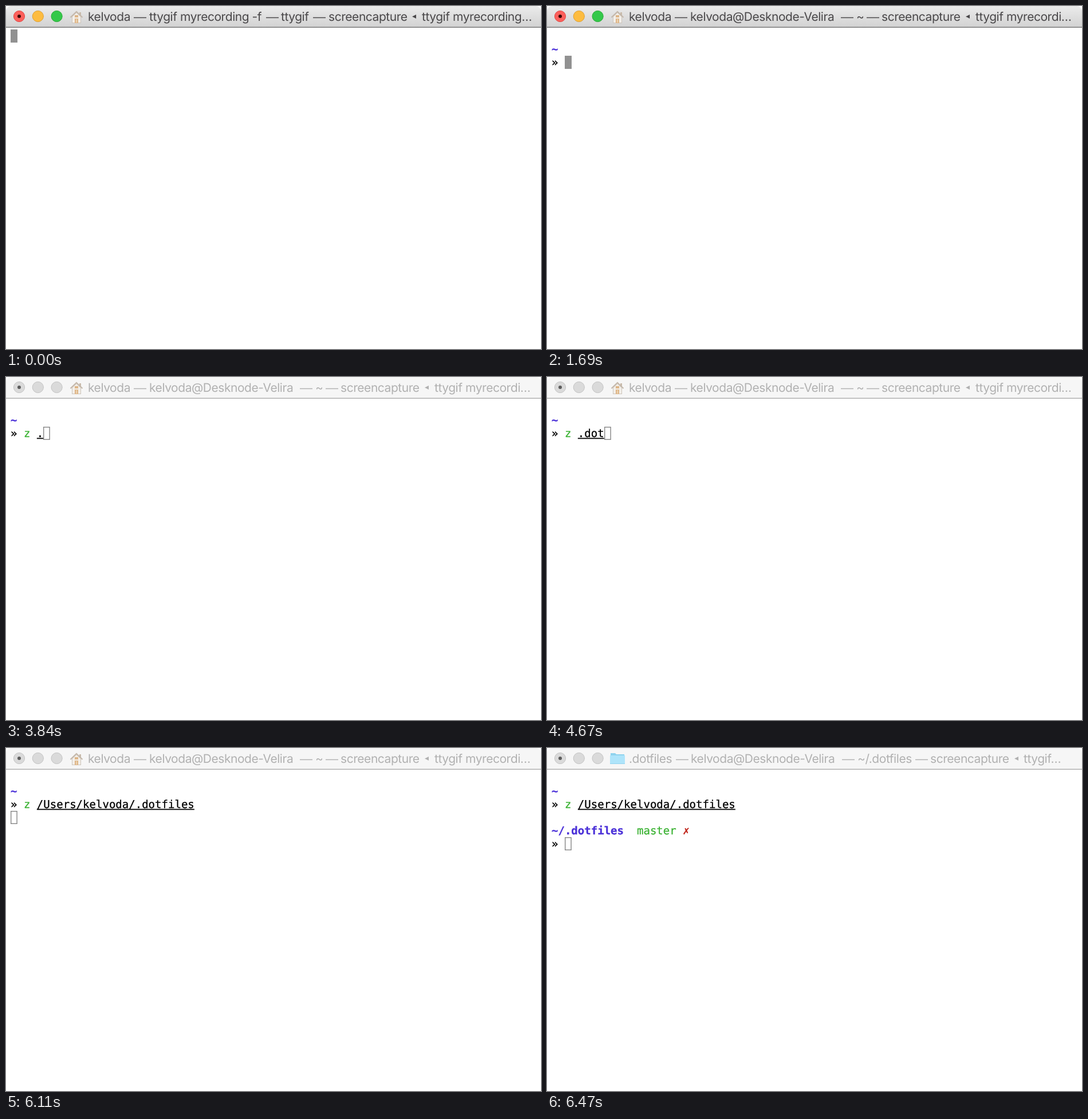
Write an HTML page with a canvas that moves like this. It is 934 by 600 pixels and loops after 8000 ms.

```html
<!DOCTYPE html>
<html lang="en">
<head>
<meta charset="utf-8">
<title>Terminal</title>
<style>
  html, body { margin: 0; width: 100%; height: 100%; overflow: hidden; background: #fff; }
  canvas { display: block; }
</style>
</head>
<body>
<canvas id="stage" width="934" height="600"></canvas>
<script>
const ctx = document.getElementById('stage').getContext('2d');
ctx.textRendering = 'geometricPrecision';
const LOOP = 8000;
const CELL = 11.46, ROW = 23, LEFT = 8, TOP = 41;
const USER = 'kelvoda', HOST = USER + '@Desknode-Velira';
const INK = '#000', BLUE = '#4b31d8', GREEN = '#3bb233', RED = '#c0261c', GREY = '#919191';

// Title pieces with their left edges
const TITLES = {
  record: [[USER, 143], ['—', 223], ['ttygif myrecording -f', 250], ['—', 454], ['ttygif', 480],
    ['—', 536], ['screencapture', 563], ['◂', 709], ['ttygif myrecording…', 726]],
  home: [[USER, 143], ['—', 223], [HOST, 250], ['—', 513], ['~', 540], ['—', 558],
    ['screencapture', 584], ['◂', 731], ['ttygif myrecordi…', 748]],
  moved: [[USER, 143], ['—', 223], [HOST, 250], ['—', 513], ['~/.dotfiles', 540], ['—', 641],
    ['screencapture', 667], ['◂', 814], ['ttygif…', 831]],
  folder: [['.dotfiles', 143], ['—', 225], [HOST, 251], ['—', 515], ['~/.dotfiles', 542], ['—', 643],
    ['screencapture', 669], ['◂', 816], ['ttygif…', 832]]
};

const PATH = `/Users/${USER}/.dotfiles`;
// [time, command typed so far]
const TYPING = [[2800, 'z'], [3070, 'z '], [3840, 'z .'], [4170, 'z .d'], [4450, 'z .do'],
  [4670, 'z .dot'], [5090, 'z .dotf'], [5360, `z ${PATH} `]];

function rect(x, y, w, h, color) {
  ctx.fillStyle = color;
  ctx.fillRect(x, y, w, h);
}

function shape(points, color) {
  ctx.fillStyle = color;
  ctx.beginPath();
  points.forEach(([x, y]) => ctx.lineTo(x, y));
  ctx.closePath();
  ctx.fill();
}

function disc(x, y, r, fill, edge) {
  ctx.beginPath();
  ctx.arc(x, y, r, 0, Math.PI * 2);
  ctx.fillStyle = fill;
  ctx.fill();
  if (edge) {
    ctx.strokeStyle = edge;
    ctx.lineWidth = 1;
    ctx.stroke();
  }
}

// A hairline stroke gives the slightly heavier smoothing of the terminal type
function print(text, col, row, color, bold) {
  const x = LEFT + col * CELL, y = TOP + row * ROW + 18;
  ctx.font = `${bold ? 'bold ' : ''}19.04px "DejaVu Sans Mono", monospace`;
  ctx.fillStyle = ctx.strokeStyle = color;
  ctx.lineWidth = 0.3;
  ctx.fillText(text, x, y);
  ctx.strokeText(text, x, y);
}

function cursor(col, row, active) {
  const x = Math.round(LEFT + col * CELL), y = TOP + row * ROW;
  if (active) return rect(x, y, 12, ROW, GREY);
  ctx.strokeStyle = '#868686';
  ctx.lineWidth = 1.4;
  ctx.strokeRect(x + 0.7, y + 0.7, 10.4, ROW - 1.4);
}

function house() {
  rect(128, 11, 3, 6, '#c9bbab');
  shape([[115, 19], [123, 11], [131, 19], [131, 30], [115, 30]], '#cdc5bc');
  shape([[116, 19], [123, 12], [130, 19], [130, 29], [116, 29]], '#f3efe9');
  rect(120, 16, 6, 4, '#deb688');
  rect(120, 22, 6, 8, '#deb688');
  rect(122, 23, 2, 6, '#ecd3b2');
  ctx.strokeStyle = '#c4b8ab';
  ctx.lineWidth = 2;
  ctx.beginPath();
  ctx.moveTo(112.5, 20);
  ctx.lineTo(123, 10);
  ctx.lineTo(133.5, 20);
  ctx.stroke();
}

function folder() {
  shape([[111, 9], [119, 9], [121, 11], [135, 11], [135, 28], [111, 28]], '#8fd3ee');
  rect(110, 13, 26, 15, '#aee4fa');
  rect(110, 27, 26, 1, '#93d4ee');
}

function titleText(name, active) {
  const color = active ? '#4a484a' : '#b1b1b1';
  ctx.letterSpacing = '-0.45px';
  for (const [text, x] of TITLES[name]) {
    if (text === '◂') {
      shape([[x, 18.5], [x + 7, 15], [x + 7, 22]], color);
      continue;
    }
    ctx.font = text === '—' ? '22px "Liberation Sans", sans-serif' : '21px Inter, sans-serif';
    ctx.fillStyle = color;
    ctx.fillText(text, x, 26);
  }
  ctx.letterSpacing = '0px';
}

function titleBar(name, active) {
  const shade = ctx.createLinearGradient(0, 0, 0, 37);
  shade.addColorStop(0, active ? '#ebebeb' : '#f6f6f6');
  shade.addColorStop(1, active ? '#d2d2d2' : '#f6f6f6');
  ctx.fillStyle = shade;
  ctx.beginPath();
  ctx.roundRect(0, 0, 934, 37, [9, 9, 0, 0]);
  ctx.fill();
  rect(0, 36.5, 934, 1.5, active ? '#7c7c7c' : '#b1b1b1');

  const fills = active ? ['#fc605c', '#fdbc40', '#34c84a'] : Array(3).fill('#dadada');
  const edges = active ? ['#df4744', '#dea032', '#27aa35'] : Array(3).fill('#c3c3c3');
  fills.forEach((fill, i) => disc(23 + i * 32.8, 18, 9.6, fill, edges[i]));
  disc(23, 18, 3, active ? '#3a0806' : '#5c5c5c');

  if (name === 'folder') folder();
  else house();
  titleText(name, active);
}

function commandLine(text) {
  const arg = text.slice(2).trim();
  print(text.slice(0, 1), 2, 2, GREEN);
  if (!arg) return;
  print(arg, 4, 2, INK);
  rect(LEFT + 4 * CELL, 106.5, arg.length * CELL, 1.8, INK);
}

function titleAt(t) {
  if (t < 1450) return 'record';
  if (t < 6210) return 'home';
  return t < 6310 ? 'moved' : 'folder';
}

function draw(t) {
  const active = t < 2800;
  rect(0, 0, 934, 600, '#fff');
  titleBar(titleAt(t), active);
  if (t < 1690) return cursor(0, 0, active);

  print('~', 0, 1, BLUE, true);
  print('»', 0, 2, INK);
  const typed = TYPING.reduce((text, [time, next]) => t >= time ? next : text, '');
  commandLine(typed);

  if (t < 6110) return cursor(2 + typed.length, 2, active);
  if (t < 6470) return cursor(0, 3, active);

  print('~/.dotfiles', 0, 4, BLUE, true);
  print('master', 13, 4, GREEN);
  print('✗', 20, 4, RED);
  print('»', 0, 5, INK);
  cursor(2, 5, active);
}

const start = performance.now();
function tick() {
  draw((performance.now() - start) % LOOP);
  requestAnimationFrame(tick);
}
tick();
</script>
</body>
</html>
```
